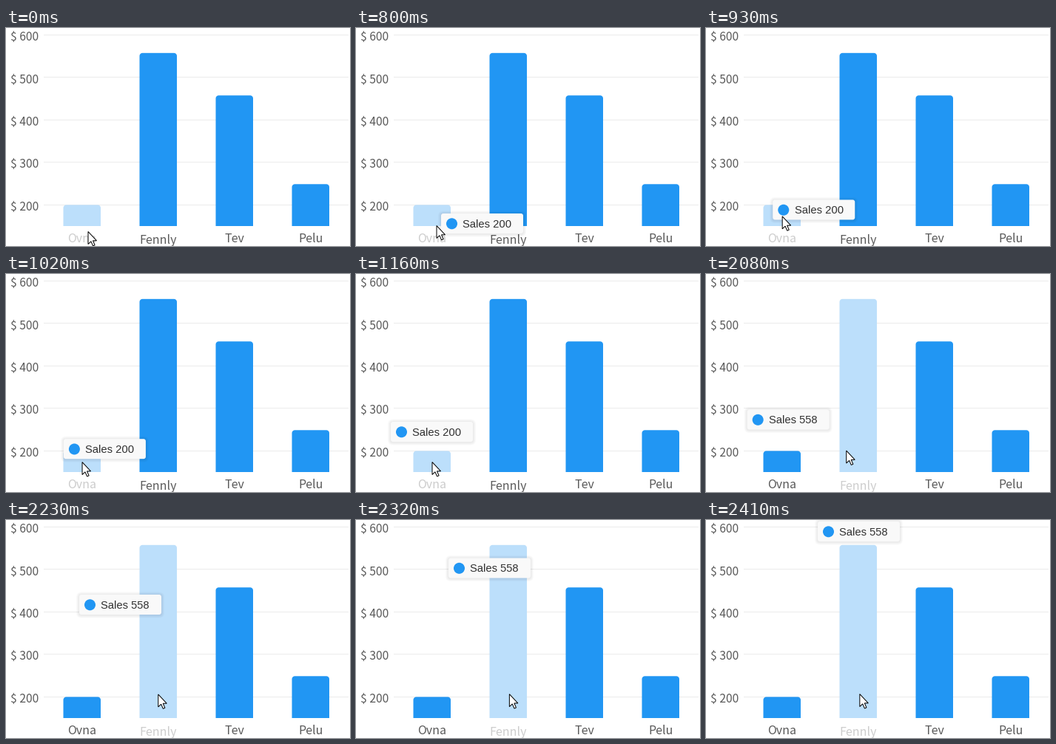
Write a matplotlib script that moves like this. It is 465x295 px and loops after 3910 ms.

```python
import numpy as np
import matplotlib.pyplot as plt
from matplotlib.animation import FuncAnimation
from matplotlib.patches import Circle, FancyBboxPatch, Polygon

W, H, DPI = 465, 295, 64
PT = 72 / DPI  # points per pixel
LOOP, TICK = 3910, 10
BLUE, PALE = "#2196f3", "#bcdffb"
LABEL, FADED, GRID = "#5a5a5a", "#cdcdcd", "#ebebeb"
SALES = {"Ovna": 200, "Fennly": 558, "Tev": 458, "Pelu": 249}
BASE_Y, SLOT, BAR_W, STEP_Y = 268, 103, 50.5, 57.43
AXIS_FONT, TIP_FONT = "Noto Sans CJK JP", "Liberation Sans"
ARROW = np.array([(0, 0), (0, 17), (3.9, 13.3), (6.6, 19.4), (9.1, 18.3),
                  (6.5, 12.3), (11.5, 12.3)])

fig = plt.figure(figsize=(W / DPI, H / DPI), dpi=DPI, facecolor="white")
ax = fig.add_axes([0, 0, 1, 1])
ax.set(xlim=(0, W), ylim=(H, 0))
ax.axis("off")


def mix(start, end, p):
    return np.array(start) + (np.array(end) - start) * min(max(p, 0), 1)


def glide(start, end, step, rate):
    """Fast start, soft landing."""
    return mix(start, end, 1 - np.exp(-rate * step))


def text(x, y, label, size, color=LABEL, font=AXIS_FONT, **kw):
    return ax.text(x, y, label, fontsize=size * PT, color=color, family=font,
                   va="baseline", **kw)


def add_bar(center, value, radius=4):
    left, right = center - BAR_W / 2, center + BAR_W / 2
    top = 9.7 + (600 - value) / 100 * STEP_Y
    a = np.linspace(0, np.pi / 2, 8)
    dx, dy = radius * (1 - np.cos(a)), radius * (1 - np.sin(a))
    points = [(left, BASE_Y), *zip(left + dx, top + dy),
              *zip(right - dx[::-1], top + dy[::-1]), (right, BASE_Y)]
    return ax.add_patch(Polygon(points, fc=BLUE, ec="none", zorder=2))


def rounded_box(grow, **kw):
    box = FancyBboxPatch((0, 0), 111 + 2 * grow, 27 + 2 * grow, lw=0,
                         boxstyle=f"round,pad=0,rounding_size={3 + grow}", **kw)
    return ax.add_patch(box)


for i in range(5):
    y = int(9.5 + STEP_Y * i) + 0.5
    ax.plot([51, 463], [y, y], color=GRID, lw=PT, zorder=1, snap=False,
            solid_capstyle="butt")
    text(6, 17.2 + STEP_Y * i, f"$ {600 - 100 * i}", 15.7)

bars, names = [], []
for i, (name, value) in enumerate(SALES.items()):
    center = 102.75 + SLOT * i
    bars.append(add_bar(center, value))
    names.append(text(center, 292 if i == 1 else 290, name, 16, ha="center"))

shadows = [(g, rounded_box(g, fc="black", alpha=0.018, zorder=5)) for g in range(1, 5)]
panel = rounded_box(0, fc="#f9f9f9", zorder=6)
dot = ax.add_patch(Circle((0, 0), 7.5, fc=BLUE, ec="none", zorder=7))
tip_text = text(0, 0, "", 14.8, "#303030", TIP_FONT, zorder=7)
tooltip = [panel, dot, tip_text] + [s for _, s in shadows]
cursor = ax.add_patch(Polygon(ARROW, fc="white", ec="black", lw=PT, zorder=9))


def scene(t):
    """Return cursor position, tooltip position and hovered bar at time t."""
    if t < 800:
        return np.array([111, 275]), None, 0
    if t < 1960:
        step = int((t - 800 + 9.99) * 0.03)  # 30 steps per second
        return (glide((109, 267), (103, 254), step, 0.9),
                mix((115, 251), (47, 200), step / 11), 0)
    step = min((t - 1960) // 30, 15)
    return (glide((110, 254), (208, 235), step, 0.42),
            mix((47, 200), (151, 2), (step - 3) / 12), int(step >= 3))


def update(frame):
    pointer, tip, hovered = scene(frame * TICK)
    for i, (bar, name) in enumerate(zip(bars, names)):
        bar.set_facecolor(PALE if i == hovered else BLUE)
        name.set_color(FADED if i == hovered else LABEL)
    cursor.set_xy(ARROW + pointer + (0, 0.5))
    for part in tooltip:
        part.set_visible(tip is not None)
    if tip is not None:
        x, y = tip
        panel.set_x(x)
        panel.set_y(y)
        for grow, shadow in shadows:
            shadow.set_x(x - grow)
            shadow.set_y(y - grow + 0.5)
        dot.center = x + 14.5, y + 13.8
        tip_text.set_position((x + 29.5, y + 19))
        tip_text.set_text(f"Sales {list(SALES.values())[hovered]}")
    return [*bars, *names, *tooltip, cursor]


animation = FuncAnimation(fig, update, frames=LOOP // TICK, interval=TICK,
                          repeat=True, repeat_delay=0)
plt.show()
```
